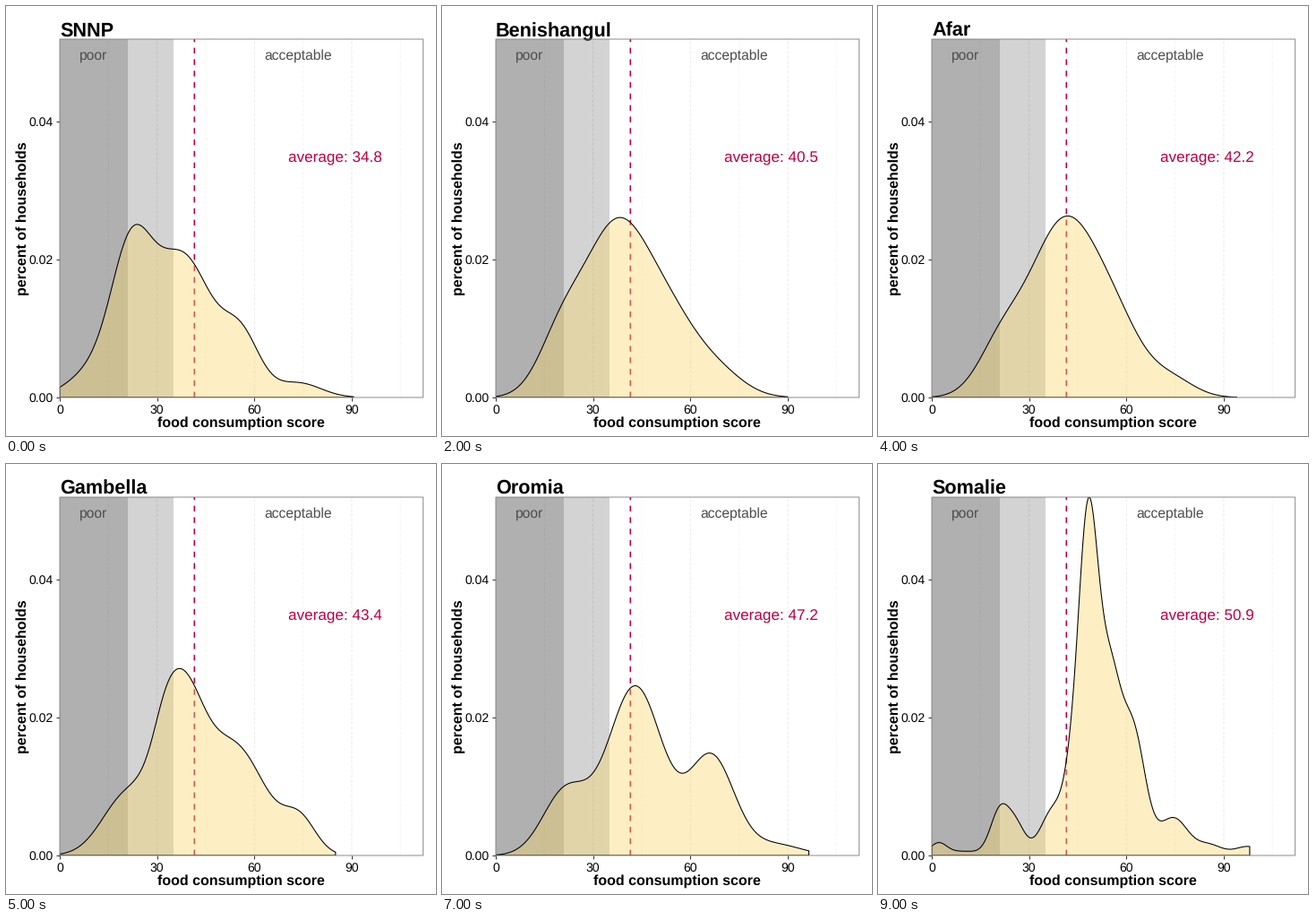
A matplotlib script for the animation above (10000 ms loop, 480 by 480 pixels).

```python
import numpy as np
import matplotlib.pyplot as plt
from matplotlib.animation import FuncAnimation
from matplotlib.patches import Rectangle

SIZE, DPI = 480, 72          # at 72 dpi one point is one pixel
LEFT, TOP, RIGHT, BASE = 60, 37, 465.7, 437
X_UNIT, Y_UNIT = 3.622, 7692
CRIMSON, GREY, INK = "#bb0045", "#4d4d4d", "#333333"

plt.rcParams["font.family"] = "Liberation Sans"
plt.rcParams["text.hinting"] = "no_hinting"


def score_x(score):
    return LEFT + score * X_UNIT


def share_y(share):
    return BASE - share * Y_UNIT


regions = []


def region(name, average, last, *bumps):
    """Density up to score `last`: a sum of bell curves.

    Each bump is (height in 1/10000, centre, spread).
    """
    scores = np.linspace(0, last, 400)
    share = sum(h * np.exp(-((scores - mid) / spread) ** 2 / 2)
                for h, mid, spread in bumps) / 1e4
    curve = np.column_stack([score_x(scores), share_y(share)])
    foot = [(score_x(last), BASE), (LEFT, BASE)]
    regions.append((name, f"average: {average:g}", np.vstack([curve, foot])))


region("SNNP", 34.8, 90.6,
       (35, 10, 7.5), (194, 22, 6.3), (203, 38, 9), (80, 56, 5.8),
       (21, 73.5, 7))

region("Amhara", 39.9, 100,
       (9, 4, 4), (122, 16.5, 3.5), (98, 27, 5), (308, 37.2, 3.6),
       (304, 46.2, 4.2), (95, 56.5, 4.2), (35, 67, 5), (12, 75.5, 3.5),
       (7, 86, 2.5), (2, 100, 3))

region("Benishangul", 40.5, 90,
       (75, 20, 7), (240, 37, 10), (95, 54, 9), (30, 69, 8))

region("Tigray", 41, 112,
       (70, 17, 5), (20, 26, 4), (250, 40, 12), (50, 65, 8),
       (15, 80, 4.5), (3.5, 102, 9))

region("Afar", 42.2, 94,
       (60, 21, 7), (255, 41, 11), (65, 58, 8), (25, 74, 7))

region("Gambella", 43.4, 85,
       (85, 20.5, 7.5), (27, 32, 3.6), (222, 37, 6.8), (156, 54, 9.5),
       (47, 74, 5))

region("Harari", 45.3, 93,
       (55, 23, 7), (270, 43, 10), (85, 59, 9), (20, 77, 7))

region("Oromia", 47.2, 96.5,
       (92, 21.5, 7), (245, 43, 8.5), (142, 66.5, 7), (16, 86, 8))

region("Diredawa", 47.5, 85,
       (123, 17, 5), (42, 28, 4.5), (42, 38.5, 4.2), (315, 47.5, 4.6),
       (240, 55.8, 3.8), (135, 67.5, 5.3))

region("Somalie", 50.9, 98,
       (17, 2, 2.6), (6, 10, 5), (67, 21.2, 3), (36, 26.3, 2.7),
       (70, 38, 4.2), (38, 42.5, 2.2), (490, 48.2, 3.2), (220, 55, 3.2),
       (178, 62, 3.8), (54, 74.5, 4.4), (15, 85.5, 4), (13, 97.5, 4))

fig = plt.figure(figsize=(SIZE / DPI, SIZE / DPI), dpi=DPI, facecolor="white")
ax = fig.add_axes([0, 0, 1, 1])
ax.set_xlim(0, SIZE)
ax.set_ylim(SIZE, 0)
ax.axis("off")


def label(x, y, text, size, va="baseline", **style):
    return ax.text(x, y, text, fontsize=size, va=va, **style)


def box(x0, x1, z, **style):
    patch = Rectangle((x0, TOP), x1 - x0, BASE - TOP, zorder=z, **style)
    return ax.add_patch(patch)


def line(xs, ys, color, width, z, **style):
    ax.plot(xs, ys, color=color, lw=width, zorder=z,
            solid_capstyle="butt", dash_capstyle="butt", **style)


def upright(score, color, width, z, dash):
    line([score_x(score)] * 2, [BASE, TOP], color, width, z,
         ls=(0, dash), snap=False)


# Grid, shaded bands and the dashed overall average
for score in range(15, 106, 15):
    upright(score, "#e9e9e9" if score % 30 == 0 else "#f5f5f5", 0.9, 1, (4, 2))
box(LEFT, score_x(21), 2, fc=(0, 0, 0, 0.31), ec="none")
box(score_x(21), score_x(35), 2, fc=(0, 0, 0, 0.173), ec="none")
upright(41.5, CRIMSON, 1.6, 3, (4, 4))

area, = ax.fill([0, 1, 1], [0, 0, 1], fc=(0.98, 0.843, 0.42, 0.4),
                ec="black", lw=1.07, zorder=4)
frame = box(LEFT, RIGHT, 6, fc="none", ec="#7f7f7f", lw=0.9, snap=False)
area.set_clip_path(frame)

# Axes
for score in (0, 30, 60, 90):
    x = score_x(score)
    line([x, x], [BASE, BASE + 4], INK, 1, 5)
    label(x, 455, str(score), 14, ha="center")
for share in (0, 0.02, 0.04):
    y = share_y(share)
    line([LEFT - 4, LEFT], [y, y], INK, 1, 5)
    label(52.7, y + 5, f"{share:.2f}", 14, ha="right")
label(262.8, 470, "food consumption score", 16, ha="center", weight="bold")
label(26, 237, "percent of households", 16, va="center", ha="right",
      weight="bold", rotation=90)

label(98, 60, "poor", 15.65, ha="center", color=GREY)
label(326, 60, "acceptable", 15.65, ha="center", color=GREY)
title = label(LEFT, 34, "", 21.6, weight="bold")
average = label(367.6, 174, "", 17.07, ha="center", color=CRIMSON)


def draw(i):
    name, mean, outline = regions[i]
    title.set_text(name)
    average.set_text(mean)
    area.set_xy(outline)
    return title, average, area


anim = FuncAnimation(fig, draw, frames=len(regions), interval=1000, repeat=True)
plt.show()
```
